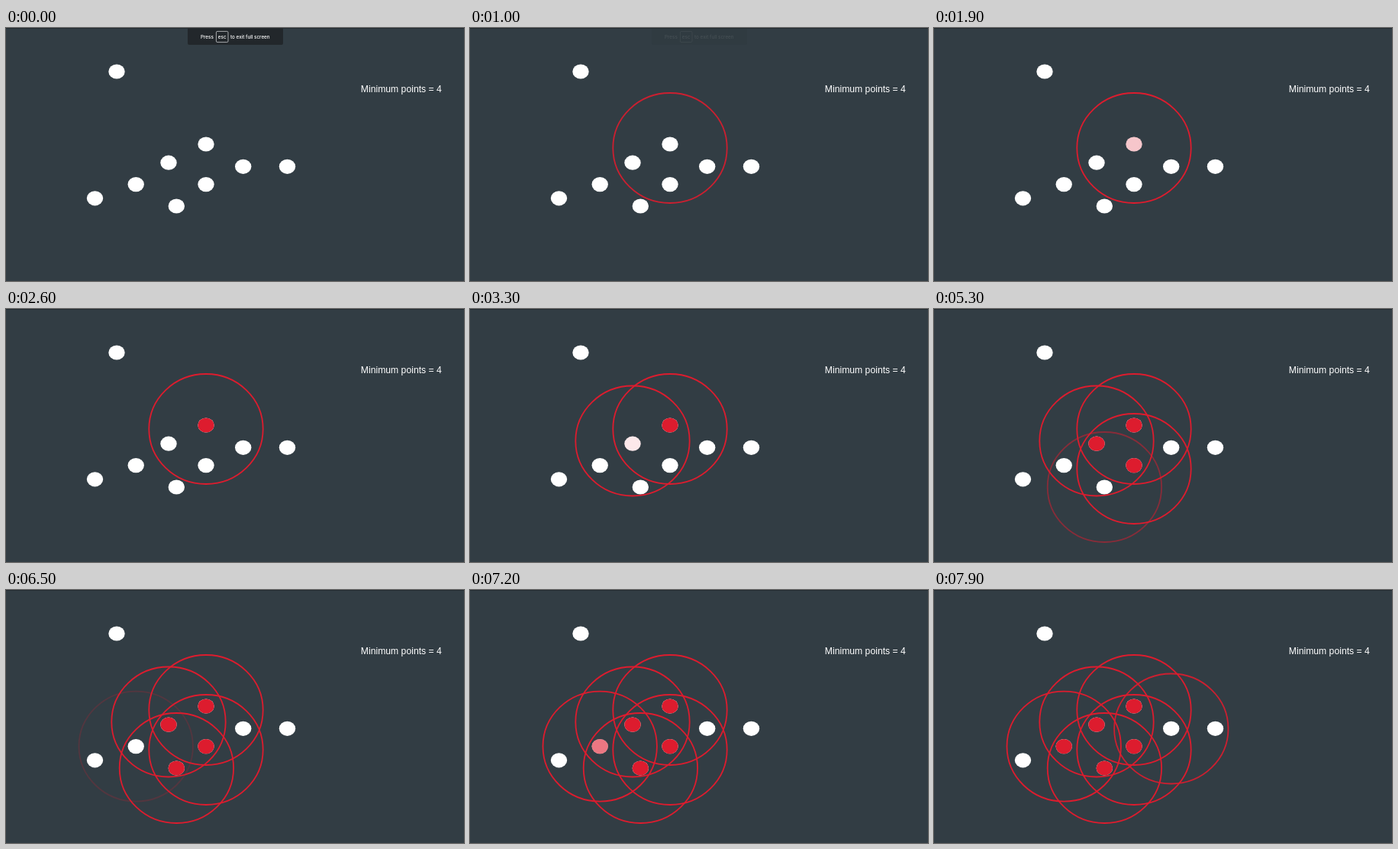
These frames come from a looping animation (600 by 331 pixels, 8000 ms). An HTML page with a canvas:

```html
<!DOCTYPE html>
<html lang="en">
<head>
<meta charset="utf-8">
<title>Density clustering</title>
<style>
  html, body { margin: 0; width: 100%; height: 100%; overflow: hidden; background: #323d44; }
  canvas { display: block; width: 600px; height: 331px; }
</style>
</head>
<body>
<canvas id="stage"></canvas>
<script>
const W = 600, H = 331, LOOP = 8000, STEP = 100;
const RED = '#dd1c2e', WHITE = '#ffffff';
const FONT = '"Liberation Sans", Arial, sans-serif';
const canvas = document.getElementById('stage');
const ctx = canvas.getContext('2d');
const dpr = window.devicePixelRatio || 1;
canvas.width = Math.round(W * dpr);
canvas.height = Math.round(H * dpr);
ctx.scale(dpr, dpr);

// Points that are never visited
const idle = [[145, 57], [368.5, 181.3], [116.5, 222.8]];

// Visited points: position, ring centre, start of ring fade, start of red fade
const visits = [
  { x: 262, y: 152, cx: 262, cy: 157, ring: 550, fill: 1700, slow: 800 },
  { x: 213, y: 176.2, cx: 213, cy: 172.5, ring: 2700, fill: 3250 },
  { x: 262, y: 204.6, cx: 262, cy: 209, ring: 3850, fill: 4370 },
  { x: 223.3, y: 233, cx: 223.4, cy: 233, ring: 5050, fill: 5600 },
  { x: 170.2, y: 204.6, cx: 170.2, cy: 204.6, ring: 6400, fill: 6900 },
  { x: 310.7, y: 181.3, cx: 310.8, cy: 181.5, ring: 7450, fill: 8000 }
];

const fade = (t, start, length = 500) => Math.min(1, Math.max(0, (t - start) / length));

function ellipse(x, y, rx, ry) {
  ctx.beginPath();
  ctx.ellipse(x, y, rx, ry, 0, 0, Math.PI * 2);
}

function dot(x, y, color, alpha = 1) {
  ctx.globalAlpha = alpha;
  ctx.fillStyle = color;
  ellipse(x, y, 10.7, 9.6);
  ctx.fill();
}

function ring(x, y, alpha) {
  ctx.globalAlpha = alpha;
  ctx.strokeStyle = RED;
  ctx.lineWidth = 1.8;
  ellipse(x, y, 74.7, 72);
  ctx.stroke();
}

function label(text, x, y, font) {
  ctx.font = font;
  ctx.fillStyle = WHITE;
  ctx.fillText(text, x, y);
}

function banner(alpha) {
  if (alpha <= 0) return;
  ctx.globalAlpha = alpha;
  ctx.fillStyle = '#22272b';
  ctx.beginPath();
  ctx.roundRect(238, -4, 125, 26, 2);
  ctx.fill();
  ctx.strokeStyle = '#c9cccf';
  ctx.lineWidth = 0.8;
  ctx.beginPath();
  ctx.roundRect(275.4, 4.4, 15.6, 14.2, 1.5);
  ctx.stroke();
  const font = '500 6.3px Inter, Roboto, sans-serif';
  label('Press', 255, 13.6, font);
  label('esc', 277.8, 13.6, font);
  label('to exit full screen', 294, 13.6, font);
}

function draw(t) {
  ctx.globalAlpha = 1;
  ctx.fillStyle = '#323d44';
  ctx.fillRect(0, 0, W, H);
  ctx.fillStyle = '#222b31';
  ctx.fillRect(0, 0, W, 1);

  for (const [x, y] of idle) dot(x, y, WHITE);
  for (const v of visits) {
    dot(v.x, v.y, WHITE);
    dot(v.x, v.y, RED, fade(t, v.fill, v.slow));
  }
  for (const v of visits) ring(v.cx, v.cy, fade(t, v.ring));

  ctx.globalAlpha = 1;
  label('Minimum points = 4', 464.8, 84, '12.2px ' + FONT);
  banner(1 - fade(t, 550));
}

function tick() {
  const t = performance.now() % LOOP;
  draw(Math.floor(t / STEP) * STEP);
  requestAnimationFrame(tick);
}
tick();
</script>
</body>
</html>
```
